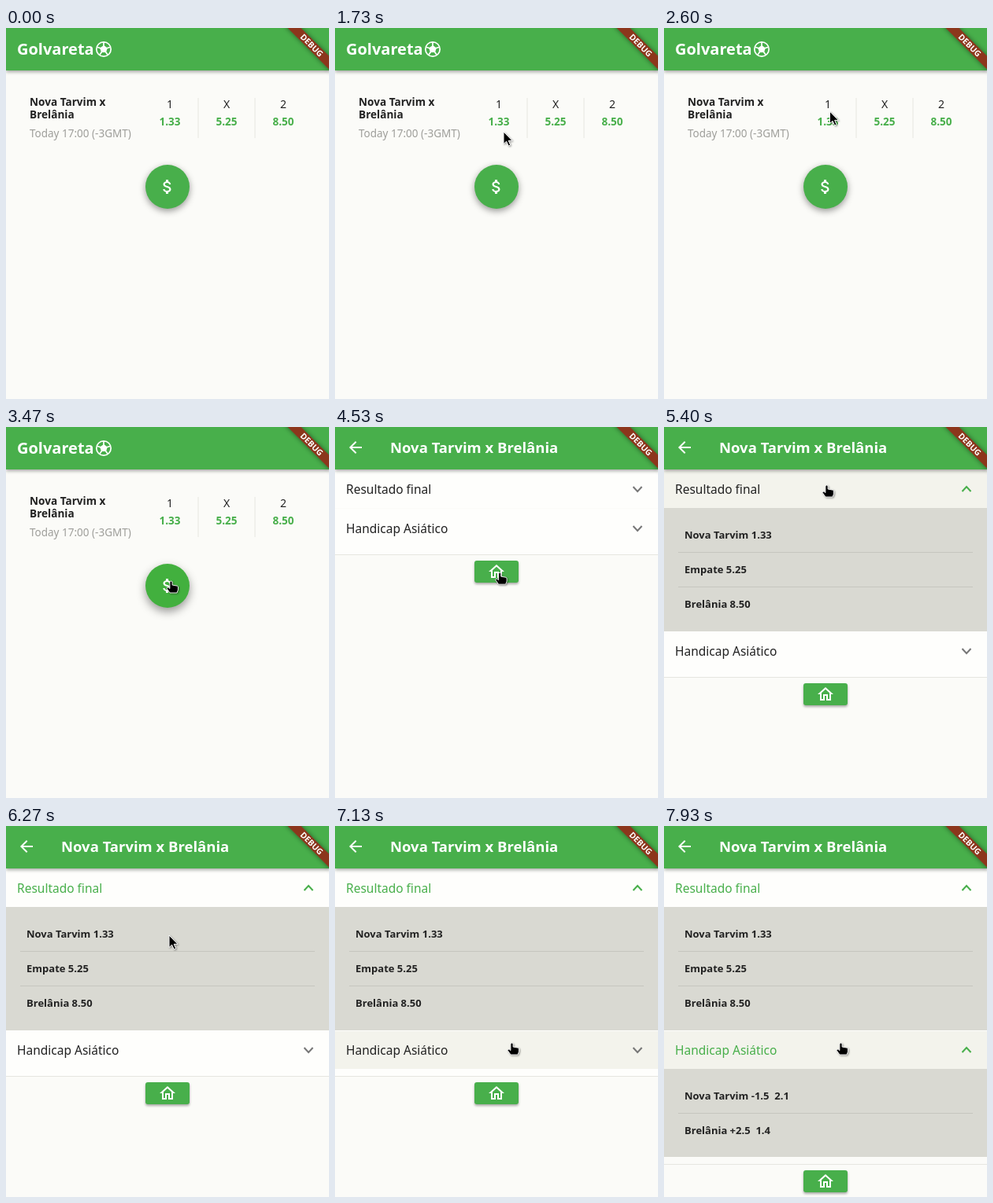
Recreate the animation shown at these times as an HTML page. Size 410 by 472 pixels, loop 8000 ms.

```html
<!DOCTYPE html>
<html lang="pt">
<head>
<meta charset="utf-8">
<title>Golvareta</title>
<style>
  html, body { margin: 0; width: 100%; height: 100%; overflow: hidden; background: #fbfbf8; }
  svg { display: block; width: 410px; height: 472px; font: 14px "Noto Sans", "Open Sans", sans-serif; fill: #222; }
  .page { fill: #fbfbf8; }
  .card { fill: #fefefc; }
  .body { fill: #d9d9d2; }
  .hover { fill: #f3f3ec; }
  .bar { fill: #48af4b; filter: drop-shadow(0 2px 2px #0005); }
  .btn { fill: #48af4b; filter: drop-shadow(0 2px 1.5px #0005); }
  .fab { fill: #48af4b; filter: drop-shadow(0 3px 4px #0006); }
  .fab.on { fill: #42b03e; filter: drop-shadow(0 5px 6px #0006); }
  .light { fill: #fff; }
  .title { font-size: 18.5px; font-weight: 600; fill: #fff; }
  .head { font-size: 15.5px; }
  .item { font-size: 13px; font-weight: 600; }
  .odd { font-size: 13.5px; font-weight: 600; fill: #48af4b; }
  .mid { text-anchor: middle; }
  .line { fill: none; stroke: #c6c6bf; }
  .rule { fill: none; stroke: #e6e6e0; }
  .chev { fill: none; stroke: #777; stroke-width: 2; }
  .chev.open { stroke: #48af4b; }
  .head.open { fill: #48af4b; }
</style>
</head>
<body>
<svg viewBox="0 0 410 472">
  <defs>
    <clipPath id="row"><rect y="55" width="410" height="48"/></clipPath>
  </defs>

  <g id="list">
    <rect class="page" width="410" height="472"/>
    <rect class="bar" width="410" height="54"/>
    <text class="title" x="14" y="34" style="font-size:20px">Golvareta</text>
    <g transform="translate(124 27)" fill="none" stroke="#fff" stroke-width="1.7">
      <circle r="9.2"/>
      <path class="light" d="M0-4L3.8-1.2 2.35 3.2H-2.35L-3.8-1.2Z"/>
      <path d="M0-4V-9M3.8-1.2L8.6-2.8M2.35 3.2L5.3 7.3M-2.35 3.2L-5.3 7.3M-3.8-1.2L-8.6-2.8"/>
    </g>
    <g font-weight="600" font-size="13.6">
      <text x="30" y="99">Nova Tarvim x</text>
      <text x="30" y="115">Brelânia</text>
    </g>
    <text x="30" y="139" font-size="13.5" fill="#9e9e9a">Today 17:00 (-3GMT)</text>
    <path class="rule" d="M244 89V140M316 89V140"/>
    <g id="odds" class="mid"></g>
    <circle id="fab" class="fab" cx="205" cy="202" r="28"/>
    <path class="light" transform="translate(193 190)" d="M11.8 10.9c-2.27-.59-3-1.2-3-2.15 0-1.09 1.01-1.85 2.7-1.85 1.78 0 2.44.85 2.5 2.1h2.21c-.07-1.72-1.12-3.3-3.21-3.81V3h-3v2.16c-1.94.42-3.5 1.68-3.5 3.61 0 2.31 1.91 3.46 4.7 4.13 2.5.6 3 1.48 3 2.41 0 .69-.49 1.79-2.7 1.79-2.06 0-2.87-.92-2.98-2.1h-2.2c.12 2.19 1.76 3.42 3.68 3.83V21h3v-2.15c1.95-.37 3.5-1.5 3.5-3.55 0-2.84-2.43-3.81-4.7-4.4z"/>
  </g>

  <g id="match">
    <rect class="page" width="410" height="472"/>
    <rect class="card" y="54" width="410" height="49"/>
    <rect id="hover1" class="hover" y="54" width="410" height="49"/>
    <circle id="ripple" cx="208" cy="77" fill-opacity=".05" clip-path="url(#row)"/>
    <text id="head1" class="head" x="14" y="84.5">Resultado final</text>
    <path id="chev1" class="chev"/>
    <g id="body1">
      <rect class="body" y="103" width="410" height="157"/>
      <path class="line" d="M18 159.5H392M18 203.5H392"/>
      <text class="item" x="26" y="142">Nova Tarvim 1.33</text>
      <text class="item" x="26" y="186">Empate 5.25</text>
      <text class="item" x="26" y="230">Brelânia 8.50</text>
    </g>
    <g id="panel2">
      <rect class="card" y="104" width="410" height="58"/>
      <rect id="hover2" class="hover" y="105" width="410" height="48"/>
      <text id="head2" class="head" x="14" y="134.5">Handicap Asiático</text>
      <path id="chev2" class="chev"/>
      <g id="body2">
        <rect class="body" y="153" width="410" height="112"/>
        <path class="line" d="M18 209.5H392"/>
        <text class="item" x="26" y="192">Nova Tarvim -1.5&#160; 2.1</text>
        <text class="item" x="26" y="236">Brelânia +2.5&#160; 1.4</text>
      </g>
    </g>
    <g id="foot">
      <path class="rule" d="M0 162.5H410"/>
      <rect class="btn" x="177" y="170" width="56" height="28" rx="3"/>
      <path class="light" transform="translate(193 172)" d="M12 5.69l5 4.5V18h-2v-6H9v6H7v-7.81l5-4.5M12 3L2 12h3v8h6v-6h2v6h6v-8h3L12 3z"/>
    </g>
    <rect class="bar" width="410" height="54"/>
    <path class="light" transform="translate(14 14)" d="M20 11H7.83l5.59-5.59L12 4l-8 8 8 8 1.41-1.41L7.83 13H20v-2z"/>
    <text class="title" x="70" y="33">Nova Tarvim x Brelânia</text>
  </g>

  <g transform="translate(388 22) rotate(45)">
    <rect x="-42" y="-6" width="84" height="12" fill="#8c361c" style="filter:drop-shadow(0 0 3px #0007)"/>
    <text class="mid light" y="3.7" font-size="10.4" font-weight="800">DEBUG</text>
  </g>

  <g id="cursor" fill="#000" stroke="#fff" stroke-linejoin="round" style="filter:drop-shadow(1px 1px 1px #0006)">
    <path id="arrow" d="M0 0V15.5L3.6 12.2 6.2 18 8.7 16.9 6.2 11.3H11Z"/>
    <path id="hand" stroke-width=".9" d="M-3.1 0Q-1.5-2 .1 0V4L6.5 5.2Q7.5 5.6 7.5 7V10L6 14H-3L-7 8.3Q-6.6 6.4-4.6 7.2L-3.1 8.6Z"/>
  </g>
</svg>
<script>
const $ = id => document.getElementById(id);
const clamp = v => Math.min(1, Math.max(0, v));
const show = (id, on) => $(id).style.display = on ? '' : 'none';
const shift = (id, x, y) => $(id).setAttribute('transform', `translate(${x} ${y})`);

$('odds').innerHTML = [['1', '1.33'], ['X', '5.25'], ['2', '8.50']].map(([name, odd], i) =>
  `<text x="${208 + 72 * i}" y="102">${name}</text><text class="odd" x="${208 + 72 * i}" y="124">${odd}</text>`).join('');

// time, x, y of the pointer tip
const path = [
  [870, 414, 270], [1730, 214, 132], [2000, 230, 157], [2330, 176, 130], [2640, 212, 105],
  [3200, 211, 197], [4470, 211, 197], [4800, 207, 76], [5330, 208, 75], [5620, 208, 75],
  [5950, 242, 331], [6270, 207, 139], [6480, 207, 105], [7130, 226, 277], [8000, 226, 277]
];

function pointer(t) {
  const i = path.findIndex(p => t < p[0]);
  if (i < 1) return path[0].slice(1);
  const [t0, x0, y0] = path[i - 1], [t1, x1, y1] = path[i];
  const k = (t - t0) / (t1 - t0), e = k * k * (3 - 2 * k);
  return [x0 + (x1 - x0) * e, y0 + (y1 - y0) * e];
}

function setPanel(n, y, open, tinted) {
  const d = open ? 3 : -3;
  $('chev' + n).setAttribute('d', `M378.5 ${y + d}L384 ${y - d}L389.5 ${y + d}`);
  $('chev' + n).classList.toggle('open', open);
  $('head' + n).classList.toggle('open', tinted);
  show('body' + n, open);
}

function draw(t) {
  const [x, y] = pointer(t);
  const onMatch = t >= 3670, open1 = t >= 5400, open2 = t >= 7400;
  const drop = open1 ? 156 : 0, end = drop + (open2 ? 112 : 0);

  show('match', onMatch);
  $('match').setAttribute('opacity', clamp((t - 3670) / 300));

  setPanel(1, 79, open1, t >= 5470);
  setPanel(2, 129, open2, t >= 7470);
  shift('panel2', 0, drop);
  shift('foot', 0, end);

  const onFab = !onMatch && Math.hypot(x - 205, y - 202) < 28;
  const on1 = onMatch && y > 54 && y < 103;
  const on2 = onMatch && y > 105 + drop && y < 153 + drop;
  const onHome = onMatch && Math.abs(x - 205) < 28 && y > 170 + end && y < 198 + end;
  $('fab').classList.toggle('on', onFab || onMatch);
  show('hover1', on1);
  show('hover2', on2);
  show('ripple', t >= 4930 && t < 5400);
  $('ripple').setAttribute('r', 215 * clamp((t - 4930) / 400));

  const hand = onFab || on1 || on2 || onHome;
  show('hand', hand);
  show('arrow', !hand);
  show('cursor', t >= 930);
  shift('cursor', x, y);
}

function tick() {
  draw(performance.now() % 8000);
  requestAnimationFrame(tick);
}
tick();
</script>
</body>
</html>
```
